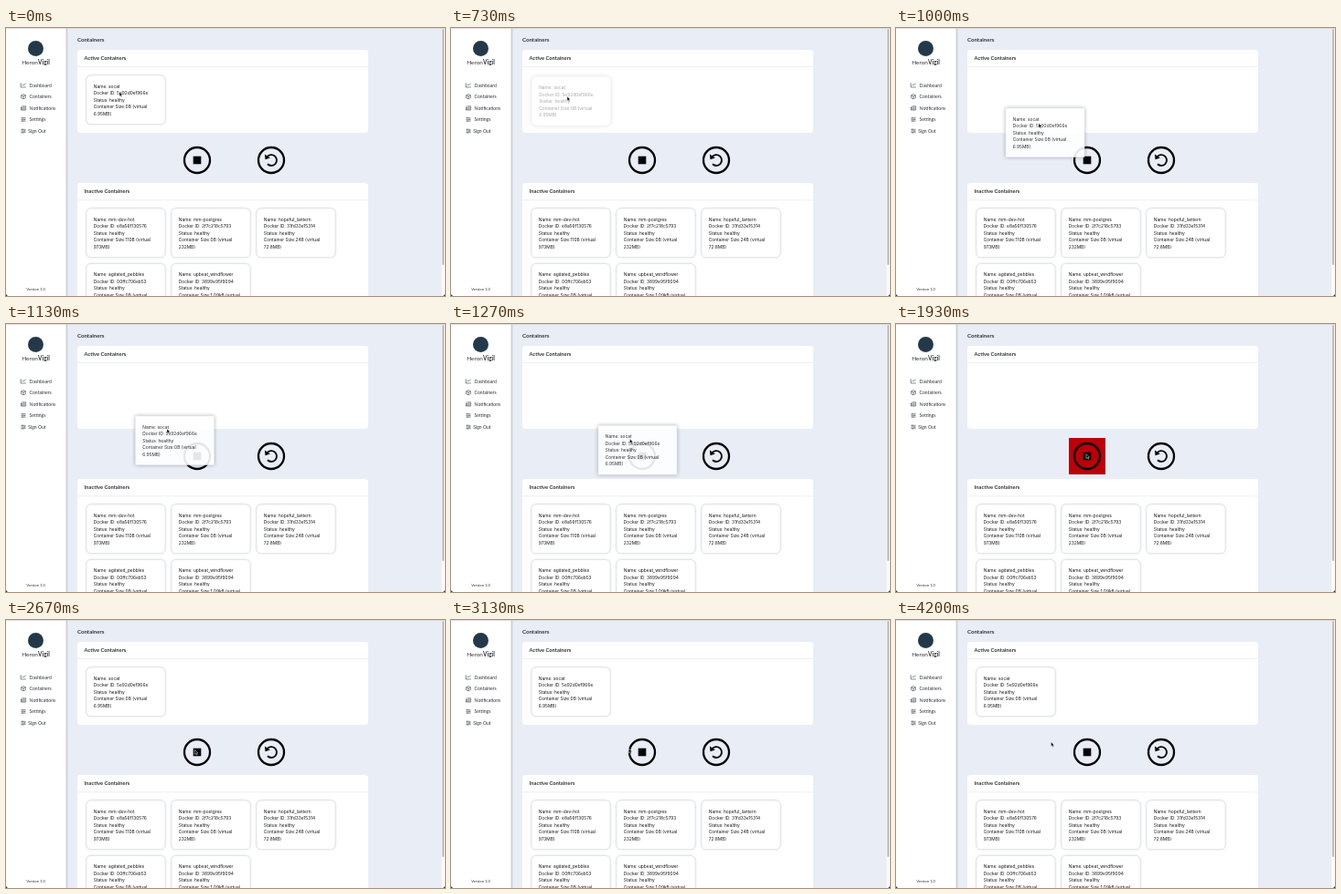
Write an HTML page that moves like this. It is 480 px wide and 294 px high and loops after 8 s.

```html
<!DOCTYPE html>
<html lang="en">
<head>
<meta charset="utf-8">
<title>Container dashboard</title>
<style>
  html, body { margin: 0; width: 100%; height: 100%; overflow: hidden; background: #fff; }
  svg { display: block; width: 100vw; height: 100vh; }
  text { font-family: Lato, sans-serif; fill: #30343b; white-space: pre; }
  .title { font-size: 6.1px; font-weight: 700; }
  .heading { font-size: 5.8px; font-weight: 700; }
  .nav { font-size: 5.1px; }
  .version { font-size: 4.2px; }
  .brand { font-size: 6.5px; text-anchor: middle; }
  .card text { font: 4.85px Inter, sans-serif; fill: #17181a; }
  .card rect { fill: #fff; stroke: #d9dde5; stroke-width: .6; filter: drop-shadow(.5px .8px 1px rgba(40, 50, 70, .2)); }
  .card.ghost rect { stroke: #e8eaee; filter: drop-shadow(0 .5px 2px rgba(30, 40, 60, .4)); }
  .icon { fill: none; stroke: #4a4e55; stroke-width: .65; }
</style>
</head>
<body>
<svg viewBox="0 0 480 294" preserveAspectRatio="none">
  <defs>
    <linearGradient id="edge">
      <stop offset="0" stop-color="#b9bec8"/>
      <stop offset="1" stop-color="#e9edf6"/>
    </linearGradient>
  </defs>
  <rect width="480" height="294" fill="#e9edf6"/>
  <rect width="66" height="294" fill="#fff"/>
  <rect x="65.7" width="2.3" height="294" fill="url(#edge)"/>

  <circle cx="32.5" cy="22.5" r="8.5" fill="#23394a"/>
  <text class="brand" x="32.5" y="39.6">Heron<tspan font-weight="700">Vigil</tspan></text>
  <g id="nav"></g>
  <text class="version" x="22.3" y="287.6">Version 1.0</text>

  <text class="title" x="78" y="15.2">Containers</text>
  <rect x="78" y="24" width="318" height="91" rx="3.5" fill="#fff"/>
  <path d="M78 42.3H396" stroke="#e6e8ee" stroke-width=".7"/>
  <text class="heading" x="85.5" y="35">Active Containers</text>
  <rect x="78" y="170" width="318" height="140" rx="3.5" fill="#fff"/>
  <path d="M78 188.8H396" stroke="#e6e8ee" stroke-width=".7"/>
  <text class="heading" x="85.5" y="181">Inactive Containers</text>

  <rect id="alert" x="189" y="125" width="40" height="40" fill="#bb0007"/>
  <g fill="none" stroke="#050505" stroke-width="2.3">
    <circle cx="209" cy="145" r="14"/>
    <circle cx="290" cy="145" r="14"/>
    <path d="M285.6 141.2A5.9 5.9 0 1 1 286 149.3" stroke-width="1.9"/>
  </g>
  <rect x="204.7" y="140.7" width="8.6" height="8.6" fill="#050505"/>
  <path d="M282.9 138.4L283.5 144.2L288.8 142.5Z" fill="#050505"/>

  <g id="cards"></g>

  <rect x="476.3" width="3.7" height="294" fill="#fafafa"/>
  <rect x="476.9" y="1" width="2.2" height="259" rx="1.1" fill="#bfbfc1"/>
  <rect width="480" height=".7" fill="#cfd0d3"/>
  <path d="M0 291.5Q.2 293.8 2.5 294H0ZM480 291.5Q479.8 293.8 477.5 294H480Z" fill="#222"/>
  <path id="cursor" d="M0 0V5L1.2 4L2 5.7L2.9 5.3L2.1 3.6H3.6Z" fill="#050505" stroke="#fff" stroke-width=".45"/>
</svg>
<script>
const LOOP = 8000, STEP = 1000 / 15;
const $ = id => document.getElementById(id);

const navItems = [
  ['Dashboard', 25.6, 'M-2.8 -2.4V2.4H2.8M-1.7 .8L-.3 -.8L.7 .2L2.5 -2'],
  ['Containers', 25.6, 'M0 -2.6L2.4 -1.4V1.4L0 2.6L-2.4 1.4V-1.4ZM-2.4 -1.4L0 -.2L2.4 -1.4M0 -.2V2.6'],
  ['Notifications', 25.6, 'M-1.4 -2H2.6V2.2H-2.6V-1H-1.4V2.2M-.4 -.8H1.6M-.4 .2H1.6M-.4 1.2H1.6'],
  ['Settings', 25.6, 'M-2.6 -1.7H2.6M-2.6 0H2.6M-2.6 1.7H2.6M-1 -2.5V-.9M1.2 -.8V.8M-.8 .9V2.5'],
  ['Sign Out', 24.2, 'M-2.6 -1.7H2.6M-2.6 0H2.6M-2.6 1.7H2.6M-1 -2.5V-.9M1.2 -.8V.8M-.8 .9V2.5']
];
$('nav').innerHTML = navItems.map(([label, x, icon], i) => {
  const y = 62.6 + i * 12.6;
  return `<path class="icon" transform="translate(19 ${y})" d="${icon}"/>
    <text class="nav" x="${x}" y="${y + 1.9}">${label}</text>`;
}).join('');

function card(x, y, [name, id, size, virtual], extra = '', radius = 5) {
  const lines = [`Name: ${name}`, `Docker ID: ${id}`, 'Status: healthy',
    `Container Size:${size} (virtual`, `${virtual})`];
  return `<g class="card ${extra}" transform="translate(${x} ${y})">
    <rect width="86" height="53.6" rx="${radius}"/>
    ${lines.map((line, i) => `<text x="7.8" y="${13.8 + i * 7.5}">${line}</text>`).join('')}</g>`;
}

const active = ['socat', '5e92d0ef966e', '0B', '6.95MB'];
const inactive = [
  ['mm-dev-hot', 'e8a56f130576', '110B', '973MB'],
  ['mm-postgres', '2f7c218c5793', '0B', '232MB'],
  ['hopeful_lantern', '31fd33e15314', '24B', '72.8MB'],
  ['agitated_pebbles', '00ffc706eb53', '0B', '108MB'],
  ['upbeat_windflower', '3899e95f9094', '1.09kB', '133MB']
];
$('cards').innerHTML =
  inactive.map((info, i) => card(88 + i % 3 * 93, 198 + Math.floor(i / 3) * 60.5, info)).join('') +
  card(88, 52, active, 'home') + card(88, 52, active, 'ghost', 0);
const home = document.querySelector('.home');
const ghost = document.querySelector('.ghost');

// Tracks hold [step, x, y]; the screen updates 15 times a second.
const cursorTrack = [
  [0, 124, 70], [7, 123.3, 69.3], [9, 123.3, 69.3], [10, 125, 71.5], [11, 127, 75],
  [13, 137, 88], [15, 156, 104.5], [17, 176, 115], [19, 195.5, 126], [20, 201, 132],
  [21, 205.5, 138], [22, 207.5, 142], [25, 208, 142.5], [39, 208, 142.5],
  [47, 194.5, 141], [58, 194.5, 141], [59, 169.5, 133.8]
];
const ghostTrack = [
  [11, 88.4, 53.3], [12, 92, 59], [13, 99, 67], [14, 108, 77], [15, 120, 88],
  [17, 131, 95], [18, 152, 107], [19, 161, 111.5], [20, 166, 116],
  [21, 170, 121], [22, 172, 125], [25, 172.5, 125.5]
];
ghostTrack[5] = [16, 131, 95];

function at(track, step) {
  const next = track.findIndex(key => key[0] > step);
  if (next < 0) return track.at(-1).slice(1);
  if (next === 0) return track[0].slice(1);
  const [s0, x0, y0] = track[next - 1], [s1, x1, y1] = track[next];
  const p = (step - s0) / (s1 - s0);
  return [x0 + (x1 - x0) * p, y0 + (y1 - y0) * p];
}
const place = (el, [x, y]) => el.setAttribute('transform', `translate(${x} ${y})`);
const show = (el, on) => el.style.display = on ? '' : 'none';

function draw(now) {
  const step = Math.floor((now % LOOP + 5) / STEP);
  place($('cursor'), at(cursorTrack, step));
  place(ghost, at(ghostTrack, step));
  ghost.style.opacity = step < 12 ? .36 : .9;
  ghost.firstElementChild.setAttribute('rx', step < 12 ? 5 : 0);
  show(home, step < 11 || step >= 32);
  show(ghost, step >= 11 && step < 29);
  show($('alert'), step >= 20 && step < 32);
}

const start = performance.now();
function tick() {
  draw(performance.now() - start);
  requestAnimationFrame(tick);
}
draw(0);
requestAnimationFrame(tick);
</script>
</body>
</html>
```
